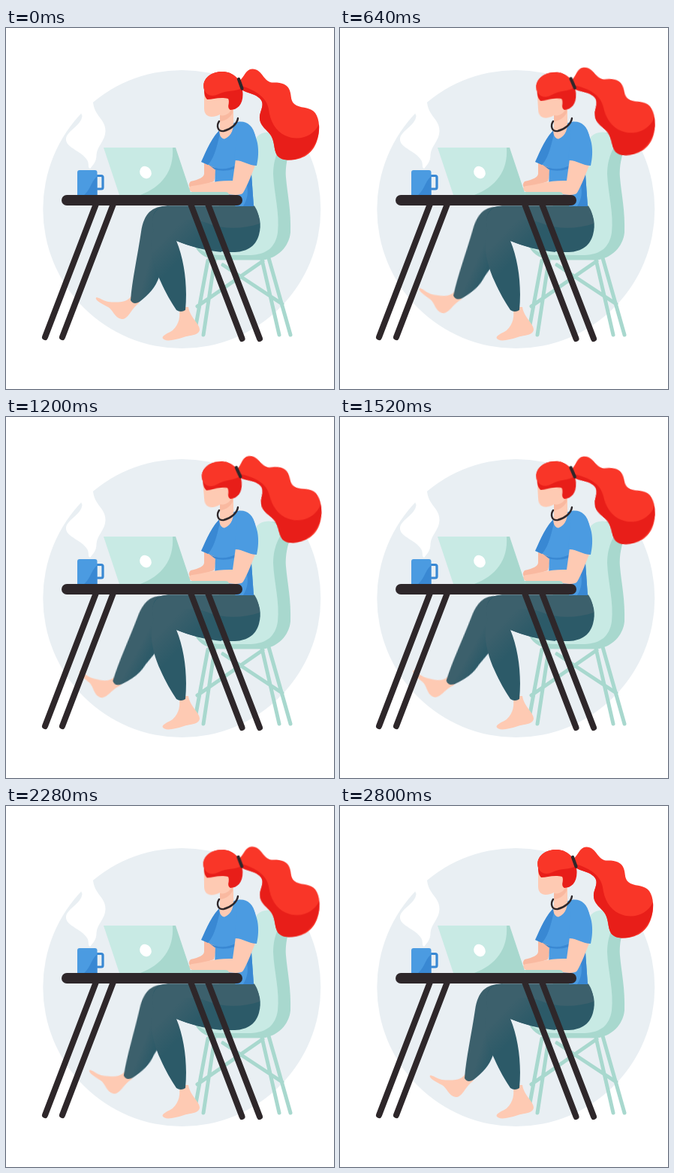
An HTML page that plays this animation: 437x480 px, repeating every 2.84 s.

```html
<!DOCTYPE html>
<html lang="en">
<head>
<meta charset="utf-8">
<title>Working at a desk</title>
<style>
html, body { margin: 0; width: 100%; height: 100%; overflow: hidden; background: #fff; }
svg { display: block; width: 437px; height: 480px; }
.skin { fill: #fecab3; }
.shade { fill: #f9b9a0; }
.mint { fill: #c8eae4; }
.sage { fill: #a8d8ce; }
.blue { fill: #4b9be1; }
.navy { fill: #3988d3; }
.red { fill: #f93628; }
.crimson { fill: #e81e19; }
.ink { fill: none; stroke: #2e272a; stroke-linecap: round; }
.rods { fill: none; stroke: #a8d8ce; stroke-width: 5; stroke-linecap: round; }
.shin, .head, .tail { animation: 2840ms infinite; }
.shin { transform-origin: 205px 248px; animation-name: swing; }
.head { transform-origin: 299px 106px; animation-name: nod; }
.tail { transform-origin: 312px 75px; animation-name: sway; }
@keyframes swing {
  0% { transform: rotate(0deg); animation-timing-function: cubic-bezier(.25, .25, .6, 1); }
  51% { transform: rotate(13deg); animation-timing-function: cubic-bezier(.4, .05, .65, 1); }
  100% { transform: rotate(0deg); }
}
@keyframes nod {
  0% { transform: rotate(0deg); animation-timing-function: cubic-bezier(.35, .15, .6, 1); }
  37% { transform: rotate(-5deg); animation-timing-function: cubic-bezier(.3, .1, .55, 1); }
  100% { transform: rotate(0deg); }
}
@keyframes sway {
  0% { transform: rotate(0deg); animation-timing-function: cubic-bezier(.35, .15, .6, 1); }
  37% { transform: rotate(-1.4deg); animation-timing-function: cubic-bezier(.3, .1, .55, 1); }
  100% { transform: rotate(0deg); }
}
</style>
</head>
<body>
<svg viewBox="0 0 437 480">
  <defs>
    <linearGradient id="far" gradientUnits="userSpaceOnUse" x1="178" y1="290" x2="212" y2="300">
      <stop offset=".5" stop-color="#3c606c"/><stop offset="1" stop-color="#2c5a68"/>
    </linearGradient>
    <linearGradient id="near" gradientUnits="userSpaceOnUse" x1="205" y1="270" x2="246" y2="310">
      <stop offset=".2" stop-color="#3c606c"/><stop offset=".8" stop-color="#2c5a68"/>
    </linearGradient>
  </defs>

  <circle cx="234.3" cy="241" r="185" fill="#e9eff3"/>

  <!-- steam -->
  <path fill="#fff" d="M112 187C108 185 112 180 107 174C100 164 81 159 80 149C79 137 100 131 101.500 117L98 108L116 92C114 116 133 120 132.500 137C132 151 121 157 120.500 169C120.500 178 116 182 112 187Z"/>

  <!-- chair -->
  <path class="rods" d="M269 309L253 395M278 309L263 408M341 308L364 408M350 306L379 408M255 370L342 310M289 315L368 367"/>
  <path class="sage" d="M338 143C352 134 378 140 377 166C374 176 372 187 373 199C375 222 380 242 379 272C377 291 362 306 342 308.500H287C270 309 258 302 252 291Z"/>
  <path class="mint" d="M334 145C346 133 368 138 365 159C359 169 356 181 356 194C357 220 365 246 362 272C359 292 347 301 326 302H286C271 302 260 297 253 290L318 260Z"/>

  <!-- legs -->
  <g class="shin">
    <path class="skin" d="M167 356C162 366 146 365 136 364C128 362 122 357 120 358.500C118 362 129 367 136 371C143 375 144 385 154 387C163 388 166 374 177 366L180 356Z"/>
    <path fill="url(#far)" d="M216 236.500C194 237 184 246 180 271C175 305 168 335 166 362Q170 369 178 364C191 354 199 345 204 331L224 292L230 250Z"/>
  </g>
  <path fill="#2c5a68" d="M216 236.500H330C338 249 341 260 337 275C332 293 317 299 298 298C266 296 244 290 227 283L196 262C193 245 201 237 216 236.500Z"/>
  <path fill="#3c606c" d="M216 236.500H331C336 244 338 253 338 260C318 267 292 268 272 261C246 250 218 257 199 276C190 254 196 238 216 236.500Z"/>
  <path class="skin" d="M230 371C233 382 231 394 222 402C216 406 209 408 208.500 412C211 418 225 415 237 411C246 408 257 409 258 401C258 393 245 385 243 371Z"/>
  <path fill="url(#near)" d="M274 262C247 249 205 254 196 272C190 289 196 316 206 337C212 351 221 366 227 375Q233 379 239 375C242 343 238 310 227 283C243 290 266 296 287 298Z"/>

  <!-- far arm and torso -->
  <path class="shade" d="M264 177L279 182C280 190 279 198 277 204L247 214C243 211 243 207 246 204C258 201 263 199 264 194Z"/>
  <path class="blue" d="M287 134L304 126C318 121 329 128 332 143L327 195L330 237H306L278 212L279 186L261 178C267 164 275 143 287 134Z"/>
  <path class="navy" d="M287 134C282 150 280 170 269 182L260 178C267 163 275 143 287 134ZM318 199L327 194L330 237H316C323 226 324 214 318 199Z"/>
  <path class="navy" d="M269 181C282 190 296 188 305 183V187C293 191 284 190 278 188Z"/>

  <!-- neck -->
  <path class="skin" d="M285 104L303 100V121C304 133 301 144 291 147.500C285 147 283 139 285 132Z"/>
  <path class="shade" d="M285 116C292 118 298 113 302 107V113C298 120 291 124 285 124Z"/>

  <!-- head -->
  <g class="head">
    <g class="tail">
      <path class="red" d="M311 70C318 65 319 55 328 54.500C341 54 342 70 354 72.500C366 72 375 74 378 83C381 91 378 98 387 103C396 107 406 105 412 113C418 121 419 138 414 151C408 168 394 176 375 175.500C353 174 361 156 353 143C347 134 337 130 338 117C340 107 346 99 336 92C330 87 322 87 314 82Z"/>
      <path class="crimson" d="M314 77C334 83 348 94 350 108C352 124 359 137 372 143C389 151 409 145 417 128C419 151 403 176 375 175.500C353 174 361 156 353 143C347 134 337 130 338 117C340 107 346 99 336 92C330 87 322 87 314 82Z"/>
    </g>
    <path class="skin" d="M264 84V107C264 114 268 118 274 118C281 118 288 114 294 108L301 88Z"/>
    <path class="crimson" d="M264 82C260 67 274 58 288 58C302 58 315 68 315.500 87C316 102 308 109 299 109C293 106 299 99 296 94C285 91 276 95 268 95C265 92 264 88 264 82Z"/>
    <path class="red" d="M264 82C260 67 274 58 288 58C301 58 312 67 314 80C306 85 294 82 283 88C275 92 267 90 264 82Z"/>
    <path class="ink" stroke-width="4.200" d="M310 68L314.500 80.500"/>
  </g>
  <path class="ink" stroke-width="2.400" d="M284 124C280 130 282 138 290 137C299 135 308 128 309 120"/>

  <!-- near arm -->
  <path class="skin" d="M306 174L333 181C327 194 323 207 316 219C313 223 304 222 292 221L248 218C242 216 243 211 248 210C264 208 280 202 302 203Z"/>
  <path class="blue" d="M308 133C322 122 331 134 335 153C337 164 336 174 334 183C323 183 314 175 304 176Z"/>

  <!-- laptop -->
  <path class="sage" d="M242 218H292Q297 218 297 222H240Z"/>
  <path class="mint" d="M130 159H225L247 222H151Z"/>
  <path class="sage" d="M222 159H226L247 222H179C208 211 224 190 222 159Z"/>
  <ellipse cx="186" cy="192" rx="7.400" ry="8.600" fill="#fff" transform="rotate(-38 186 192)"/>

  <!-- mug -->
  <rect x="119" y="196.500" width="10" height="17.500" rx="2" fill="none" stroke="#3988d3" stroke-width="3.200"/>
  <rect class="blue" x="95" y="189" width="26.500" height="36" rx="3"/>
  <path class="navy" d="M121.500 197V224H101C112 218 113 204 121.500 197Z"/>

  <!-- table -->
  <path class="ink" stroke-width="8" d="M120 234L52 411M143 234L75 411M246 234L314.500 413M269 234L338 413"/>
  <path class="ink" stroke-width="14" d="M81 229H308"/>
</svg>
</body>
</html>
```
